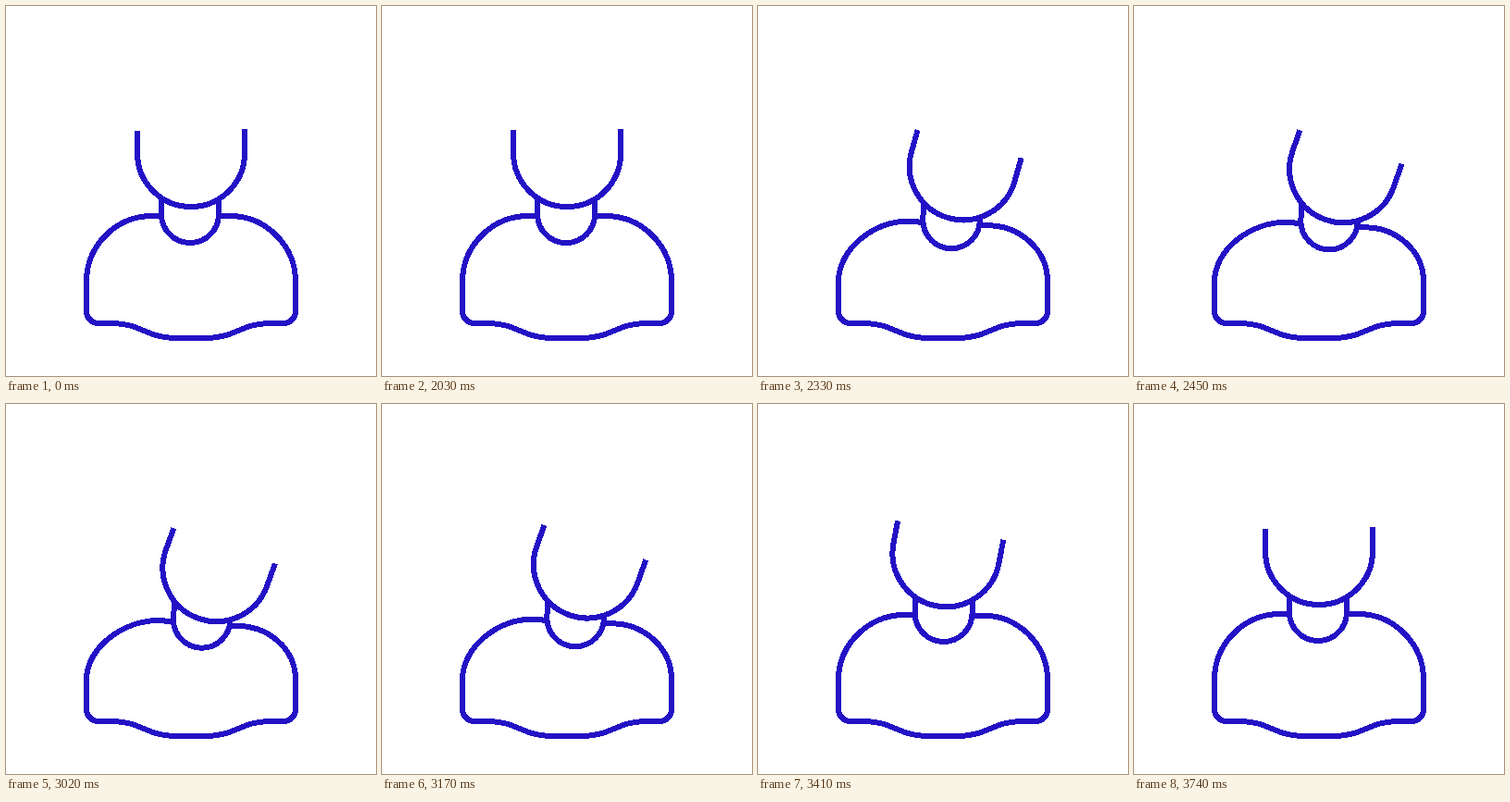
Recreate the animation shown at these times as an HTML page. Size 400 by 400 pixels, loop 3770 ms.

```html
<!DOCTYPE html>
<html lang="en">
<head>
<meta charset="utf-8">
<title>Tilting head</title>
<style>
html, body { margin: 0; width: 100%; height: 100%; overflow: hidden; background: #fff; }
svg { display: block; width: 100vw; height: 100vh; }
path { fill: #fff; stroke: #2312c5; stroke-width: 6; stroke-linejoin: round; shape-rendering: crispEdges; }
</style>
</head>
<body>
<svg viewBox="0 0 400 400">
  <path id="body"/>
  <path id="neck"/>
  <path id="head" d="M-58 -24.5V0A58 58 0 0 0 58 0V-26"/>
</svg>
<script>
const LOOP = 3770;
const [body, neck, head] = ['body', 'neck', 'head'].map(id => document.getElementById(id));

const progress = (t, from, to) => Math.min(1, Math.max(0, (t - from) / (to - from)));
const smooth = x => x * x * (3 - 2 * x);

// cubic-bezier(.45, 0, .25, 1)
function ease(x) {
  let lo = 0, hi = 1;
  for (let i = 0; i < 24; i++) {
    const s = (lo + hi) / 2, r = 1 - s;
    if (1.35 * s * r * r + 0.75 * s * s * r + s * s * s < x) lo = s; else hi = s;
  }
  return smooth(lo);
}

function draw(t) {
  const lean = ease(progress(t, 2000, 2610));
  const p = lean - ease(progress(t, 2990, 3665));
  const tilt = 20 * (lean - smooth(progress(t, 3120, 3740)));
  const mix = (a, b) => (a + (b - a) * p).toFixed(2);
  const pt = (x0, y0, x1, y1) => `${mix(x0, x1)} ${mix(y0, y1)} `;

  body.setAttribute('d',
    'M' + pt(168, 227, 181, 236) + 'L' + pt(158, 227, 168, 234) +
    'C' + pt(119, 227, 126, 233) + pt(87, 259, 87, 264) + '87 298' +
    'V330A13 13 0 0 0 100 343H114C146 343 152 359 184 359H216' +
    'C248 359 254 343 286 343H300A13 13 0 0 0 313 330V298' +
    'C' + pt(313, 259, 313, 264) + pt(281, 227, 283, 240) + pt(242, 227, 250, 240) +
    'L' + pt(231, 227, 242, 240));

  // The arc radius grows to half the neck width, giving a semicircle.
  neck.setAttribute('d',
    'M' + pt(168, 200, 182.5, 208) + 'L' + pt(168, 225, 181, 233) +
    'A30 30 0 0 0 ' + pt(230, 225, 242.5, 233) + 'L' + pt(230, 200, 243, 208));

  head.setAttribute('transform', `translate(${pt(200, 159, 227.6, 177.2)}) rotate(${tilt.toFixed(2)})`);
}

const start = performance.now();
function tick() {
  draw((performance.now() - start) % LOOP);
  requestAnimationFrame(tick);
}
tick();
</script>
</body>
</html>
```
